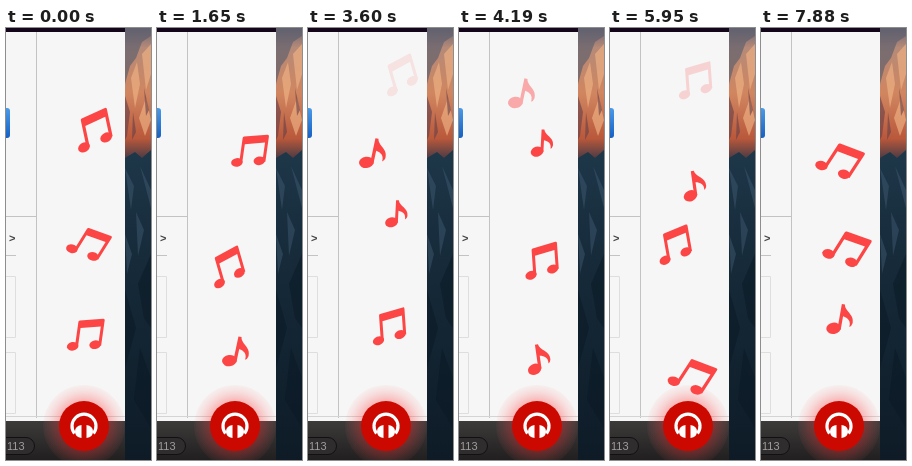
Animation, 145 px wide and 432 px high, one loop 8000 ms. Source, as an HTML page:

```html
<!DOCTYPE html>
<html lang="en">
<head>
<meta charset="utf-8">
<title>Floating notes</title>
<style>
  html, body { margin: 0; width: 100%; height: 100%; overflow: hidden; background: #f6f6f6; }
  svg { display: block; width: 100vw; height: 100vh; }
  text { font-family: "Liberation Sans", Arial, sans-serif; }
  #notes { fill: #fc4646; filter: blur(.45px); }
</style>
</head>
<body>
<svg viewBox="0 0 145 432" preserveAspectRatio="none">
  <defs>
    <linearGradient id="blue" x2="0" y2="1">
      <stop stop-color="#4a9aea"/><stop offset="1" stop-color="#1560c4"/>
    </linearGradient>
    <linearGradient id="bar" x2="0" y2="1">
      <stop stop-color="#3d3a3a"/><stop offset="1" stop-color="#211f1f"/>
    </linearGradient>
    <linearGradient id="rock" x2="0" y2="1">
      <stop stop-color="#6d6674"/><stop offset=".15" stop-color="#b58a78"/>
      <stop offset=".5" stop-color="#d08660"/><stop offset=".85" stop-color="#b9583b"/>
      <stop offset="1" stop-color="#4d3b44"/>
    </linearGradient>
    <linearGradient id="shade" x2="0" y2="1">
      <stop stop-color="#2b4257"/><stop offset=".3" stop-color="#1d3648"/>
      <stop offset=".55" stop-color="#162a39"/><stop offset="1" stop-color="#0e1b27"/>
    </linearGradient>
    <radialGradient id="halo">
      <stop offset=".6" stop-color="#f33" stop-opacity=".34"/>
      <stop offset=".84" stop-color="#f55" stop-opacity=".15"/>
      <stop offset="1" stop-color="#f66" stop-opacity=".05"/>
    </radialGradient>
    <g id="pair">
      <ellipse cx="-11.5" cy="14" rx="5.8" ry="4.3" transform="rotate(-18 -11.5 14)"/>
      <ellipse cx="10.5" cy="9.3" rx="5.8" ry="4.3" transform="rotate(-18 10.5 9.3)"/>
      <path d="M-9.2-11Q-9.2-12.3-8-12.6L15-17.6Q16.6-17.9 16.6-16.2V9.5H13.6V-9.6L-6.2-5.2V14.2H-9.2Z"/>
    </g>
    <g id="single">
      <ellipse cx="-5.5" cy="9.3" rx="7" ry="5.4" transform="rotate(-18 -5.5 9.3)"/>
      <path d="M-1.8-15H1.2C2-8.5 12-7.5 11.5 1.5Q11 4.5 9 5.5C9.8-.5 6-2.8 1.4-3.5V9.5H-1.8Z"/>
    </g>
  </defs>

  <rect width="119" height="432" fill="#f6f6f6"/>
  <rect width="119" height="4" fill="#13061a"/>
  <rect x="-8" y="80" width="12" height="30" rx="3" fill="url(#blue)"/>
  <g fill="none" stroke="#c3c3c3">
    <path d="M30.5 4V390M0 188.5H30M0 227.5H10"/>
    <path d="M-1 248.5H9.5V309.5H-1M-1 324.5H9.5V385.5H-1" stroke="#dedede"/>
    <path d="M0 388.5H119" stroke="#d4d4d4"/>
  </g>
  <text x="3" y="214" font-size="11" font-weight="bold" fill="#444">&gt;</text>

  <rect y="393" width="119" height="39" fill="url(#bar)"/>
  <rect x="-12" y="409.500" width="40.500" height="17" rx="8.500" fill="#2f2d2d" stroke="#121111"/>
  <text x="1" y="422" font-size="11" fill="#a09d9d">113</text>

  <g>
    <rect x="119" width="26" height="432" fill="url(#shade)"/>
    <path d="M119 0H145V122L136 130L129 124L119 130Z" fill="url(#rock)"/>
    <path d="M119 0H145V8L136 14L130 30L124 38L119 56Z" fill="#5b5f6e" opacity=".65"/>
    <path d="M125 50L131 34L134 56L129 80ZM136 26L145 16V46L140 62ZM133 90L140 70L145 92L139 108Z" fill="#f0b284" opacity=".65"/>
    <path d="M119 68L124 84L121 108L119 112ZM138 60L143 82L140 88ZM127 84L130 104L126 112Z" fill="#65404a" opacity=".6"/>
    <path d="M119 140L128 158L125 182ZM134 138L145 162V180ZM130 184L138 202L132 228ZM119 206L126 226L121 246Z" fill="#49627a" opacity=".4"/>
    <path d="M145 226L132 256L138 290L145 300ZM119 262L130 300L119 340ZM134 320L145 350V400L128 372Z" fill="#0b1824" opacity=".5"/>
  </g>

  <circle cx="78" cy="398" r="41" fill="url(#halo)"/>
  <g id="notes"></g>
  <circle cx="78" cy="398" r="25" fill="#cb0900"/>
  <path d="M68.500 405.500A12 12 0 1 1 87.500 405.500" fill="none" stroke="#fff" stroke-width="3.200"/>
  <path d="M75.500 397V410Q69 409 69 403.500T75.500 397ZM80.500 397V410Q87 409 87 403.500T80.500 397Z" fill="#fff"/>
</svg>
<script>
const LOOP = 8000, START = { x: 78, y: 398 };

// shape, rotation, scale, then two passing points: time, x, y
const notes = [
  ['pair', -12, 1.08, 0, 87, 102, 500, 88, 44],
  ['pair', 32, 1, 0, 83, 215, 1050, 70, 102],
  ['pair', 8, 1, 0, 80, 306, 1050, 87, 189],
  ['pair', -16, 1, 1050, 70, 298, 2400, 74, 165],
  ['single', 12, 1.05, 2400, 78, 248, 3600, 66, 126],
  ['single', 3, .92, 2400, 86, 330, 3600, 89, 186],
  ['pair', -4, 1, 3600, 81, 298, 4930, 84, 150],
  ['single', -8, 1, 4930, 82, 252, 5930, 85, 145],
  ['pair', -10, 1, 4930, 69, 337, 6990, 76, 55],
  ['pair', 33, 1.08, 6990, 85, 224, 7880, 79, 131],
  ['pair', 32, 1.08, 6990, 82, 313, 7880, 86, 219],
  ['single', 10, 1.05, 7880, 80, 291, 8880, 84, 171]
].map(([shape, turn, size, t1, x1, y1, t2, x2, y2]) => {
  const el = document.createElementNS('http://www.w3.org/2000/svg', 'use');
  el.setAttribute('href', '#' + shape);
  document.getElementById('notes').append(el);
  return { el, turn, size, t1, x1, y1, t2, x2, y2 };
});

const clamp = (v, lo, hi) => Math.min(hi, Math.max(lo, v));

// Parabola through the start and both passing points
function swayX({ x1, y1, x2, y2 }, y) {
  const a = (x1 - START.x) / (y1 - START.y);
  const b = ((x2 - x1) / (y2 - y1) - a) / (y2 - START.y);
  return clamp(START.x + (y - START.y) * (a + b * (y - y1)), 64, 97);
}

function draw(t) {
  for (const n of notes) {
    const y = n.y1 + (n.y2 - n.y1) * (t - n.t1) / (n.t2 - n.t1);
    const visible = y < START.y && y > 40;
    n.el.style.display = visible ? '' : 'none';
    if (!visible) continue;
    const scale = n.size * clamp((START.y - y) / 50, .05, 1);
    n.el.setAttribute('transform',
      `translate(${swayX(n, y)} ${y}) rotate(${n.turn}) scale(${scale})`);
    n.el.setAttribute('opacity', clamp((y - 40) / 60, 0, 1));
  }
}

// The picture advances in steps, slightly shorter in the second half
function stepped(t) {
  const [from, step] = t < 4189 ? [0, 150] : [4189, 147.4];
  return from + Math.floor((t - from) / step) * step;
}

const begin = performance.now();
function tick() {
  draw(stepped((performance.now() - begin) % LOOP));
  requestAnimationFrame(tick);
}
tick();
</script>
</body>
</html>
```
